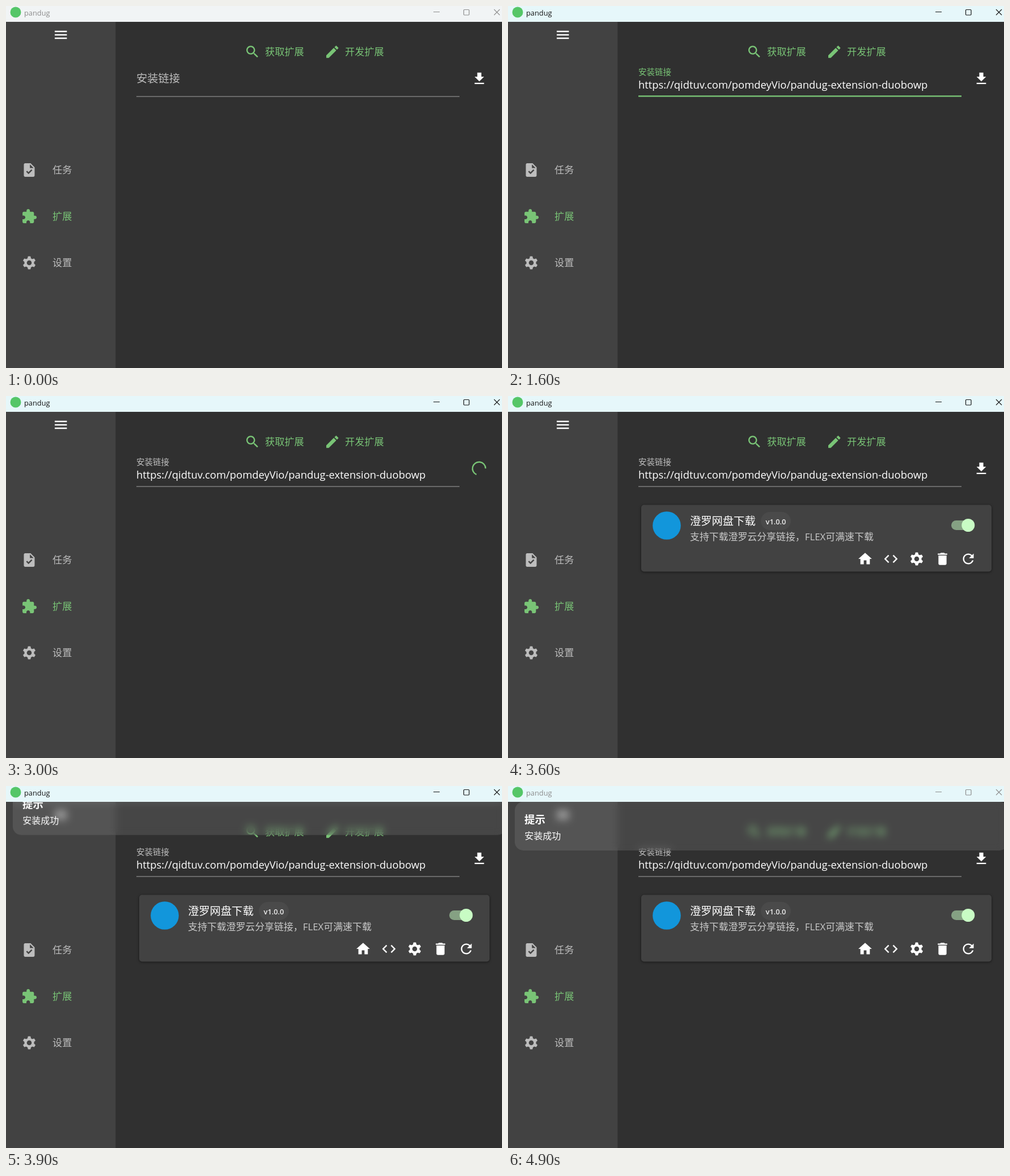
Write an HTML page that moves like this. It is 875x640 px and loops after 5 s.

```html
<!DOCTYPE html>
<html lang="zh-CN">
<head>
<meta charset="utf-8">
<title>pandug</title>
<style>
html, body { margin: 0; width: 100%; height: 100%; overflow: hidden; background: #303030; }
svg { position: absolute; left: 0; top: 0; display: block; }
text { font-family: "Open Sans", "Noto Sans CJK SC", "Noto Sans CJK", sans-serif; white-space: pre; }
#client { position: absolute; left: 0; top: 28px; width: 875px; height: 612px; overflow: hidden; }
#toast {
  position: absolute; left: 12px; top: 0; width: 870px; height: 86px; border-radius: 15px;
  background: rgba(158, 158, 158, .2); backdrop-filter: blur(7px);
}
</style>
</head>
<body>
<svg id="stage" width="875" height="640"></svg>
<div id="client"><div id="toast"><svg width="864" height="86" fill="#fff">
  <text x="17" y="38" font-size="18.4" font-weight="700">提示</text>
  <text x="17.3" y="65.5" font-size="16">安装成功</text>
</svg></div></div>
<script>
const GREEN = '#79c476', GREY = '#bdbdbd';
const $ = id => document.getElementById(id);

// Icons on a 24 unit grid
const tooth = a => `<path transform="rotate(${a} 12 12)" d="M9.4 6.2 10 2.8Q10.1 2.4 10.5 2.4H13.5Q13.9 2.4 14 2.8L14.6 6.2Z"/>`;
const path = d => `<path d="${d}"/>`;
const ICONS = {
  menu: path('M3 18h18v-2H3v2zm0-5h18v-2H3v2zm0-7v2h18V6H3z'),
  task: path('M14 2H6c-1.1 0-1.99.9-1.99 2L4 20c0 1.1.89 2 1.99 2H18c1.1 0 2-.9 2-2V8l-6-6zm-3.06 16L7.4 14.46l1.41-1.41 2.12 2.12 4.24-4.24 1.41 1.41L10.94 18zM13 9V3.5L18.5 9H13z'),
  puzzle: path('M20.5 11H19V7c0-1.1-.9-2-2-2h-4V3.5C13 2.12 11.88 1 10.5 1S8 2.12 8 3.5V5H4c-1.1 0-1.99.9-1.99 2v3.8H3.5c1.49 0 2.7 1.21 2.7 2.7s-1.21 2.7-2.7 2.7H2V20c0 1.1.9 2 2 2h3.8v-1.5c0-1.49 1.21-2.7 2.7-2.7 1.49 0 2.7 1.21 2.7 2.7V22H17c1.1 0 2-.9 2-2v-4h1.5c1.38 0 2.5-1.12 2.5-2.5S21.88 11 20.5 11z'),
  gear: path('M12 4.8a7.2 7.2 0 1 0 0 14.4a7.2 7.2 0 1 0 0-14.4zM12 8.4a3.6 3.6 0 1 1 0 7.2a3.6 3.6 0 1 1 0-7.2z') +
    [0, 60, 120, 180, 240, 300].map(tooth).join(''),
  search: path('M15.5 14h-.79l-.28-.27C15.41 12.59 16 11.11 16 9.5 16 5.91 13.09 3 9.5 3S3 5.91 3 9.5 5.91 16 9.5 16c1.61 0 3.09-.59 4.23-1.57l.27.28v.79l5 4.99L20.49 19l-4.99-5zm-6 0C7.01 14 5 11.99 5 9.5S7.01 5 9.5 5 14 7.01 14 9.5 11.99 14 9.5 14z'),
  edit: path('M3 17.25V21h3.75L17.81 9.94l-3.75-3.75L3 17.25zM20.71 7.04c.39-.39.39-1.02 0-1.41l-2.34-2.34c-.39-.39-1.02-.39-1.41 0l-1.83 1.83 3.75 3.75 1.83-1.83z'),
  download: path('M19 9h-4V3H9v6H5l7 7 7-7zM5 18v2h14v-2H5z'),
  home: path('M10 20v-6h4v6h5v-8h3L12 3 2 12h3v8z'),
  code: path('M9.4 16.6L4.8 12l4.6-4.6L8 6l-6 6 6 6 1.4-1.4zm5.2 0l4.6-4.6-4.6-4.6L16 6l6 6-6 6-1.4-1.4z'),
  trash: path('M6 19c0 1.1.9 2 2 2h8c1.1 0 2-.9 2-2V7H6v12zM19 4h-3.5l-1-1h-5l-1 1H5v2h14V4z'),
  reload: path('M17.65 6.35C16.2 4.9 14.21 4 12 4c-4.42 0-7.99 3.58-7.99 8s3.57 8 7.99 8c3.73 0 6.84-2.55 7.73-6h-2.08c-.82 2.33-3.04 4-5.65 4-3.31 0-6-2.69-6-6s2.69-6 6-6c1.66 0 3.14.69 4.22 1.78L13 11h7V4l-2.35 2.35z')
};
const icon = (name, x, y, fill = '#fff') =>
  `<g transform="translate(${x} ${y}) scale(1.19) translate(-12 -12)" fill="${fill}">${ICONS[name]}</g>`;
const text = (s, x, y, size, fill, extra = '') =>
  `<text x="${x}" y="${y}" font-size="${size}" fill="${fill}" ${extra}>${s}</text>`;
const rect = (x, y, w, h, fill, extra = '') =>
  `<rect x="${x}" y="${y}" width="${w}" height="${h}" fill="${fill}" ${extra}/>`;

$('stage').innerHTML =
  rect(0, 28, 875, 612, '#303030') + rect(0, 28, 193.4, 612, '#424242') +
  rect(0, 0, 875, 28, '#f0f3f6', 'id="bar"') +
  '<circle cx="17" cy="11" r="9.5" fill="#55c668"/>' +
  `<g id="chrome">${text('pandug', 32, 16.5, 12.8, 'currentColor')}
    <path d="M754 10.5h11M861 6l10 10M871 6l-10 10" fill="none" stroke="currentColor" stroke-width="1.1"/>
    <rect x="807.5" y="6.5" width="9.5" height="9.5" rx="1.2" fill="none" stroke="currentColor" stroke-width="1.2"/></g>` +
  icon('menu', 96.7, 51) +
  icon('task', 41, 290, GREY) + text('任务', 82, 296, 17.2, GREY) +
  icon('puzzle', 41, 372, GREEN) + text('扩展', 82, 378, 17.2, GREEN) +
  icon('gear', 41, 454, GREY) + text('设置', 82, 460, 17.2, GREY) +
  rect(554, 70, 121, 26, GREEN, 'id="hover" rx="5" opacity=".1"') +
  icon('search', 434.7, 81, GREEN) + text('获取扩展', 457, 87, 17.2, GREEN) +
  icon('edit', 575.7, 81, GREEN) + text('开发扩展', 598, 87, 17.2, GREEN) +
  text('安装链接', 230, 135, 19.3, GREY, 'id="label"') +
  text('https://qidtuv.com/pomdeyVio/pandug-extension-duobowp', 230, 146, 18.4, '#fff', 'id="url"') +
  rect(230, 159, 570, 1, '#8f8f8f', 'id="line"') +
  rect(231, 125, 2.3, 26, GREEN, 'id="caret"') +
  '<circle id="ripple" cx="835" cy="129" r="38" fill="#fff"/>' +
  `<g id="save">${icon('download', 835, 128.5)}</g>` +
  `<path id="spin" fill="none" stroke="${GREEN}" stroke-width="2.4"/>` +
  '<g id="card">' +
  rect(235, 192.5, 618, 118, '#424242', 'rx="5" style="filter:drop-shadow(0 1.5px 2px #0008)"') +
  '<circle cx="280" cy="229" r="24.8" fill="#1296db"/>' +
  text('澄罗网盘下载', 321, 228, 19.3, '#fff') +
  rect(446, 205, 53, 32, '#4a4a4a', 'rx="16"') +
  text('v1.0.0', 472.5, 226.5, 12.8, '#eee', 'font-weight="600" text-anchor="middle"') +
  text('支持下载澄罗云分享链接，FLEX可满速下载', 321, 255, 16.9, '#cacaca') +
  rect(782, 220, 39, 17, '#85a183', 'rx="8.5"') +
  '<circle cx="811.8" cy="228.5" r="11.5" fill="#c8fcc4"/>' +
  ['home', 'code', 'gear', 'trash', 'reload'].map((n, i) => icon(n, 630 + 45.5 * i, 288)).join('') +
  '</g>';

const clamp = x => Math.min(1, Math.max(0, x));
const mix = (a, b, p) => a + (b - a) * p;
const blend = (a, b, p) => `rgb(${a.map((v, i) => Math.round(mix(v, b[i], p)))})`;
const set = (id, attrs) => { for (const k in attrs) $(id).setAttribute(k, attrs[k]); };
const show = (id, on) => { $(id).style.display = on ? '' : 'none'; };

// cubic-bezier(.4, 0, .2, 1)
function ease(x) {
  x = clamp(x);
  if (x === 0 || x === 1) return x;
  let lo = 0, hi = 1;
  for (let i = 0; i < 20; i++) {
    const u = (lo + hi) / 2, v = 1 - u;
    if (1.2 * v * v * u + .6 * v * u * u + u ** 3 < x) lo = u; else hi = u;
  }
  return 3 * (1 - lo) * lo * lo + lo ** 3;
}

// Indeterminate ring: head runs ahead, then the tail catches up
function ring(ms) {
  const r = 11.6, phase = ms / 1333 % 1, full = 1.5 * Math.PI;
  const head = ease(phase * 2) * full, tail = ease(phase * 2 - 1) * full;
  const from = -Math.PI / 2 + tail + ms / 2222 * 2 * Math.PI + phase * Math.PI / 2;
  const sweep = Math.max(head - tail, .02);
  const at = a => `${834.5 + r * Math.cos(a)} ${128.3 + r * Math.sin(a)}`;
  return `M${at(from)}A${r} ${r} 0 ${sweep > Math.PI ? 1 : 0} 1 ${at(from + sweep)}`;
}

function draw(t) {
  const active = t >= 700 && t < 4900;
  $('chrome').style.color = active ? '#151515' : '#8d8d8d';
  set('bar', { fill: blend([241, 244, 245], [230, 247, 250], clamp((t - 700) / 200)) });
  show('hover', t >= 200 && t < 400);

  const lift = ease((t - 660) / 200), focus = lift - ease((t - 2360) / 200);
  set('label', {
    y: mix(135, 122.4, lift), 'font-size': mix(19.3, 14.5, lift),
    fill: blend([189, 189, 189], [121, 196, 118], focus)
  });
  const h = 1.2 + 1.2 * focus;
  set('line', { y: 160.6 - h, height: h, fill: blend([143, 143, 143], [121, 196, 118], focus) });

  const pasted = t >= 1100;
  show('url', pasted);
  show('caret', t >= 700 && t < 1600 || t >= 2100 && t < 2400);
  set('caret', { x: pasted ? 230.5 + urlWidth : 230.7 });

  const loading = t >= 2400 && t < 3600;
  show('save', !loading);
  show('spin', loading);
  if (loading) set('spin', { d: ring(t - 2220) });
  set('ripple', { opacity: t < 2300 ? 0 : t < 2400 ? .08 : .16 * clamp((2800 - t) / 400) });

  show('card', t >= 3600);
  show('toast', t > 3700);
  const left = 1 - clamp((t - 3700) / 740);
  $('toast').style.transform = `translateY(${-86 * (1 - Math.sqrt(1 - left * left))}px)`;
}

const urlWidth = $('url').getComputedTextLength();
const start = performance.now();
function tick() {
  const t = (performance.now() - start) % 5000;
  draw(Math.floor(t / 100) * 100); // ten pictures a second
  requestAnimationFrame(tick);
}
tick();
</script>
</body>
</html>
```
